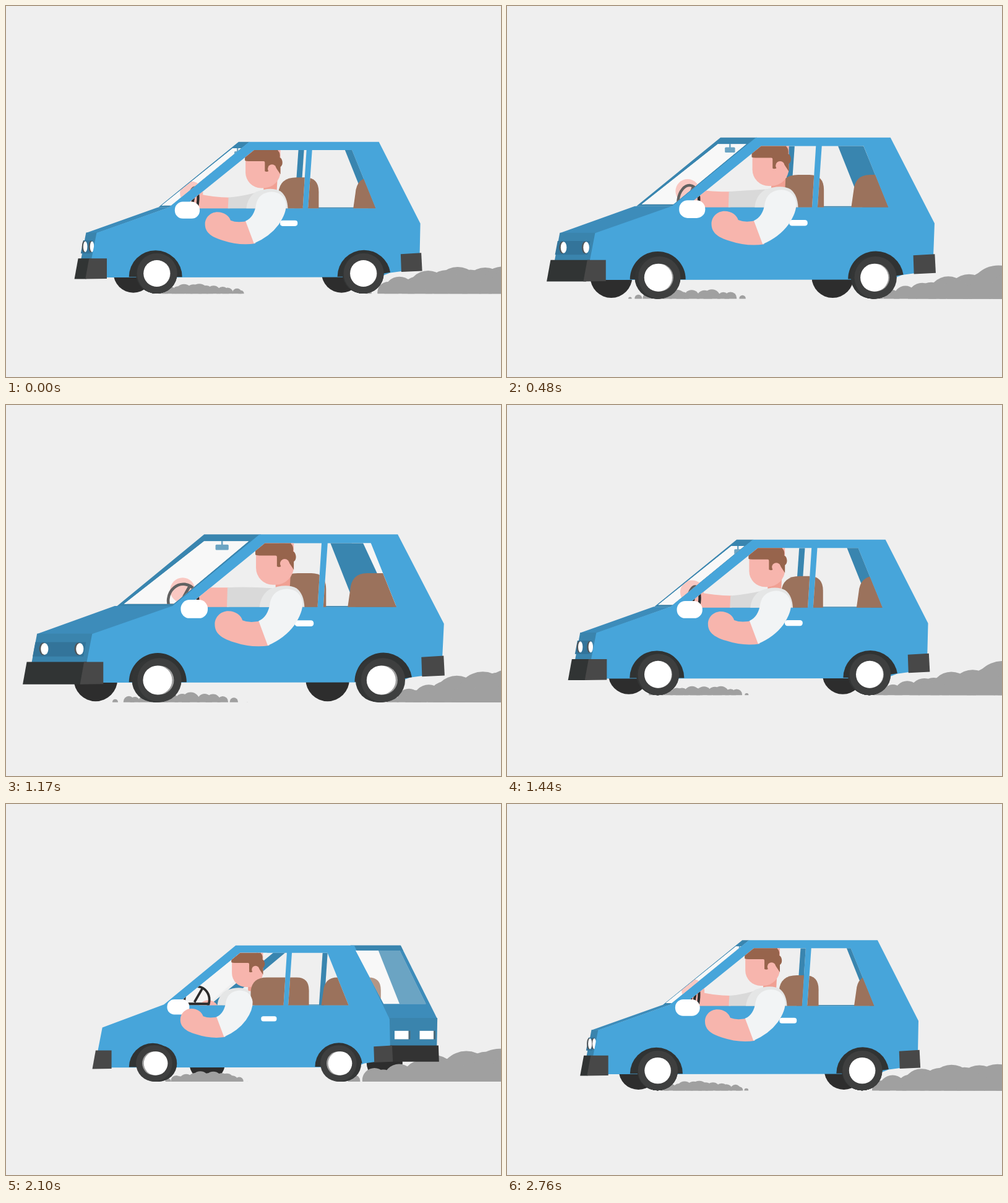
Animation, 800 px wide and 600 px high, one loop 2.79 s. Source, as an HTML page with a canvas:

```html
<!DOCTYPE html>
<html lang="en">
<head>
<meta charset="utf-8">
<title>Driving</title>
<style>
html, body { margin: 0; width: 100%; height: 100%; overflow: hidden; background: #efefef; }
canvas { display: block; width: 800px; height: 600px; }
</style>
</head>
<body>
<canvas id="stage" width="800" height="600"></canvas>
<script>
const ctx = document.getElementById('stage').getContext('2d');
const LOOP = 2790, STEP = 30, TURN = 2 * Math.PI;
const BG = '#efefef', BLUE = '#47a5da', HOOD = '#3d8cba', FRAME = '#3985af', FACE = '#3a84ad';
const SKIN = '#f7b5ad', HAIR = '#97644c', SEAT = '#9b725c', SMOKE = '#a0a0a0';
const RUBBER = '#343636', BUMPER = '#484848';

// Turn of the car: time and how far the far side shows, in pixels
const TURNS = [[0, 17], [480, 57], [750, 90], [1170, 89], [1440, 26], [2100, -75], [2700, -5]];

// Cyclic Catmull-Rom curve through the turns
function turnAt(t) {
  const n = TURNS.length;
  t = (t + LOOP) % LOOP;
  const time = i => TURNS[(i + n) % n][0] + LOOP * Math.floor(i / n);
  const val = i => TURNS[(i + n) % n][1];
  const slope = i => (val(i + 1) - val(i - 1)) / (time(i + 1) - time(i - 1));
  let i = n - 1;
  while (time(i) > t) i--;
  const h = time(i + 1) - time(i), u = (t - time(i)) / h, v = 1 - u;
  return val(i) * (1 + 2 * u) * v * v + slope(i) * h * u * v * v
    + val(i + 1) * u * u * (3 - 2 * u) - slope(i + 1) * h * u * u * v;
}

// d: depth offset, z: zoom, w: foreshortened width, shift: d in car units
let d, z, w, shift, bob, ground;

function pose(t) {
  d = turnAt(t);
  z = 0.995 + 0.00118 * turnAt(t - STEP);
  w = z - 0.009 * (d / 75) ** 2;
  shift = d / w;
  bob = 1 + 1.9 * Math.cos(TURN * (8 * t / LOOP - 0.04)) - 0.03 * d;
  ground = 464 + 163 * (z - 1);
}

// Car space: k = 0 is the near side, k = 1 the far side
const CABIN = -0.05, WHEEL = -0.04;
const sx = (x, k = 0) => 233 + (x - 233) * w - k * d;
const layer = (k = 0) => ctx.setTransform(w, 0, 0, z, sx(0, k), 280 + bob - 280 * z);
const screen = () => ctx.setTransform(1, 0, 0, 1, 0, 0);

function trace(pts) {
  pts.forEach(([x, y, k = 0], i) => ctx[i ? 'lineTo' : 'moveTo'](x - k * shift, y));
  ctx.closePath();
}
function poly(color, pts) {
  ctx.fillStyle = color;
  ctx.beginPath();
  trace(pts);
  ctx.fill();
}
// The strip an edge sweeps between two depths; it starts a little under the body
function face(color, a, b, far = 1, near = -0.08) {
  poly(color, [[...a, near], [...b, near], [...b, far], [...a, far]]);
}
function shape(color, path) {
  ctx.fillStyle = color;
  ctx.fill(new Path2D(path));
}
function oval(color, x, y, rx, ry = rx) {
  ctx.fillStyle = color;
  ctx.beginPath();
  ctx.ellipse(x, y, rx, ry, 0, 0, TURN);
  ctx.fill();
}
function box(color, x, y, width, height, r = 0) {
  ctx.fillStyle = color;
  ctx.beginPath();
  ctx.roundRect(x, y, width, height, r);
  ctx.fill();
}

const FRONT_WINDOW = [[399, 231], [483, 231], [477, 324.5], [283, 324.5]];
const REAR_WINDOW = [[492, 231], [556, 231], [594, 324.5], [485.5, 324.5]];
const WINDSCREEN = [[379, 228, 0.86], [379, 228, 0.05], [266, 320, 0.03], [266, 320, 0.93]];
const BACK_GLASS = [[605, 227, 0.02], [605, 227, 0.97], [652, 322, 0.97], [652, 322, 0.06]];

// Seeded by index, 0 to 1
const noise = i => { const v = Math.sin(i * 127.1 + 3) * 43758.5; return v - Math.floor(v); };

function puffs(count, t, from, to, size) {
  for (let i = 0; i < count; i++) {
    const p = (t / 930 + (i + 0.7 * noise(i)) / count) % 1;
    const r = size(p) * (0.75 + 0.4 * noise(i + 40));
    oval(SMOKE, from + (to - from) * p, ground - r * 0.12, r);
  }
}
function smoke(t) {
  ctx.save();
  ctx.beginPath();
  ctx.rect(0, 0, 800, ground);
  ctx.clip();
  const from = Math.min(sx(243, 1), 245) + 10;
  puffs(13, t, from, 390, p => 13.5 * Math.sqrt(Math.sin(Math.PI * p)));
  puffs(13, t, sx(575) + 5, 880, p => 52 * Math.sqrt(p));
  ctx.restore();
}

function farWheel(x, spread) {
  const offset = d * spread + 19 - 0.00275 * d * d;
  oval('#2d2d2d', sx(x, WHEEL) - offset, ground - 33.5 * z, 32 * z);
}
function nearWheel(x) {
  const cx = sx(x, WHEEL), cy = ground - 32.5 * z, r = 32.3 * z;
  for (let i = 8; i > 0; i--) oval(RUBBER, cx - d * 0.0125 * i, cy, r);
  oval('#3e3f3f', cx, cy, r);
  oval(SMOKE, cx, cy, 21.3 * z);
  oval('#fff', cx - d * 0.035, cy, 21.3 * z);
}
function arch(x, y, end) {
  ctx.fillStyle = '#303333';
  ctx.beginPath();
  ctx.arc(x, y, 42.7, Math.PI, end);
  ctx.lineTo(x, y);
  ctx.fill();
}

function front() {
  face(HOOD, [147, 364], [262, 323]);
  face(FRAME, [262, 323], [391, 218], 0.955);
  face(FACE, [147, 363.5], [139, 406]);
  face('#33749a', [142, 376], [138, 397], 0.97, 0.05);
  const rx = 3 + d * 0.036;
  for (const k of [0.17, 0.81]) {
    const x = 142 - k * shift;
    oval('#50565a', x - 1.2, 386, rx, 9.2);
    oval('#fff', x + 0.6, 386, rx * 0.9, 8.7);
  }
  face('#313434', [135, 405], [129, 438], 1.04);
}
function back() {
  face(HOOD, [600, 218], [666, 349]);
  face(FRAME, [600, 218], [604.5, 227]);
  face(FACE, [666, 347], [665, 400]);
  for (const k of [0.09, 0.63]) {
    face('#4d6b7a', [665, 370], [665, 385], k + 0.34, k);
    face('#fff', [665, 370], [665, 385], k + 0.3, k);
  }
  face('#333', [668, 396], [669, 425]);
}
function body() {
  poly(BLUE, [[147, 364], [262, 323, CABIN], [391, 218, CABIN], [600, 218], [666, 349, -0.03],
    [665, 420], [640, 425], [618, 428], [600, 435], [163, 435.5], [139, 430], [139, 405]]);
}

// Rounded seat back whose front edge leans by `lean`
function seat(l, r, lean) {
  shape(SEAT, `M${l} 328L${l + lean} 300Q${l + lean + 2} 275 ${l + 29} 275H${r - 22}
    Q${r} 275 ${r} 298V328Z`);
}
function seats() {
  const a = Math.abs(shift);
  seat(443 - 0.3 * a, 506 - 0.2 * shift, 0);
  seat(567 - (d > 0 ? 0.56 : 0.27) * a, 627 - 0.3 * shift, 4);
}

function farSide() {
  const k = d > 0 ? 0.75 : 1.1;
  face(FRAME, [483, 231], [476.5, 325], 0.77, 0.77 - 9 / shift);
  poly(FRAME, [[555, 225, k], [603, 225, k], [650, 325, k], [595, 325, k]]);
  if (d < 0) poly(FRAME, [[262, 323, 1], [391, 218, 1], [412, 218, 1], [283, 325, 1]]);
  box(FRAME, 270, 323, 340, 3);
  const width = 8 + 0.14 * Math.abs(shift), x = 382 - 0.57 * shift;
  box(FRAME, x - 1.2, 226, 2.4, 9);
  box(FRAME, x - width / 2, 233, width, 8, 1.5);
}

function cockpit() {
  const drop = Math.max(0, -d) * 0.45, lift = Math.max(0, shift) * 0.17;
  const hand = 304 - 0.33 * shift + drop * 0.3;
  const cuff = 361.5 - 0.22 * shift, top = 310 - lift + drop;
  face('#555757', [270, 320], [270, 324], 0.92, 0);
  oval(SKIN, hand, 300 + drop, 18.5);
  shape(SKIN, `M${hand + 8} ${302 + drop - lift / 2}Q${cuff - 25} ${top} ${cuff + 2} ${top}
    V${327 + drop}H${hand}Z`);

  const cx = 307 - (d > 0 ? 0.36 : 0.17) * shift, rx = 4 + 0.22 * Math.abs(shift);
  ctx.strokeStyle = '#2c2c2c';
  ctx.lineWidth = 4.2;
  ctx.beginPath();
  ctx.ellipse(cx, 315, rx, 24, 0.12, 0, TURN);
  ctx.moveTo(cx - rx * 0.2, 319);
  ctx.lineTo(cx + rx * 0.45, 294);
  ctx.moveTo(cx - rx, 322);
  ctx.lineTo(cx + rx, 322);
  ctx.stroke();

  shape('#d9d9d9', `M${cuff} ${top}Q${cuff + 25} ${top - 2} 410 ${297 + drop}V${328 + drop}H${cuff - 1}Z`);
}

const armDepth = () => d > 0 ? -0.12 : -0.38;

function driver() {
  layer(-0.06);
  poly('#f0a093', [[414, 280], [436, 280], [435, 299], [414, 299]]);
  box(SKIN, 385, 222, 56, 70, [0, 0, 27, 25]);
  shape(HAIR, `M384 220V248Q386 249 390 249H414Q416 249 416 251V265Q420 267 423 264V257
    L433 258L441 270V258Q445 255 444 249Q443 244 440 243Q441 235 437 232V220Z`);
  oval(SKIN, 427.5, 261, 6.8);
  box(SKIN, 423, 261, 10, 10, 4);
  layer(armDepth());
  shape('#e5e6e6', 'M385 328Q386 307 401 298Q425 289 440 297Q452 306 452 328Z');
  layer(CABIN);
}

function nearArm() {
  layer(armDepth());
  shape(SKIN, `M339 330.5C350 330.5 358 337 360 344Q372 349 390 344L400 381
    Q374 385 347 376C327 370 319 362 319 350C319 339 328 330.5 339 330.5Z`);
  shape('#f2f4f5', `M401 318Q405 299 426 298Q446 299 449 318Q450 332 437 351
    Q423 370 397.5 381L384 345Q398 339 401 318Z`);
}

function cabin() {
  const glass = d > 0 ? WINDSCREEN : BACK_GLASS, behind = d > 0 ? BACK_GLASS : WINDSCREEN;
  ctx.save();
  layer(CABIN);
  ctx.beginPath();
  [FRONT_WINDOW, REAR_WINDOW, glass].forEach(trace);
  ctx.clip();
  box(BG, 0, 200, 900, 140);
  [glass, behind].forEach(pts => poly('#f5f5f5', pts));
  farSide();
  const parts = [seats, cockpit, driver];
  // Turned away, the seat backs cover the driver
  if (d < 0) parts.push(parts.shift());
  parts.forEach(part => part());
  poly('rgba(255,255,255,.25)', glass);
  ctx.restore();
}

function draw(t) {
  pose(t);
  screen();
  box(BG, 0, 0, 800, 600);
  farWheel(243.5, 1.19);
  farWheel(575, 1.04);
  smoke(t);

  layer();
  (d > 0 ? front : back)();
  body();
  cabin();

  layer(WHEEL);
  arch(241, 434.7, 0);
  arch(575.5, 434.2, -0.16);
  layer();
  poly(BUMPER, [[135, 405], [163.5, 405], [163.5, 437.5], [129, 438]]);
  poly(BUMPER, [[635, 398], [668, 396], [669.5, 425], [636, 426.5]]);

  screen();
  nearWheel(243.5);
  nearWheel(575);

  layer(-0.09);
  box('#fff', 440, 344, 28, 9, 4);
  box('#fff', 271, 314, 40, 27, 13);
  nearArm();
}

const start = performance.now();
function tick() {
  const t = (performance.now() - start) % LOOP;
  draw(Math.floor(t / STEP) * STEP);
  requestAnimationFrame(tick);
}
tick();
</script>
</body>
</html>
```
